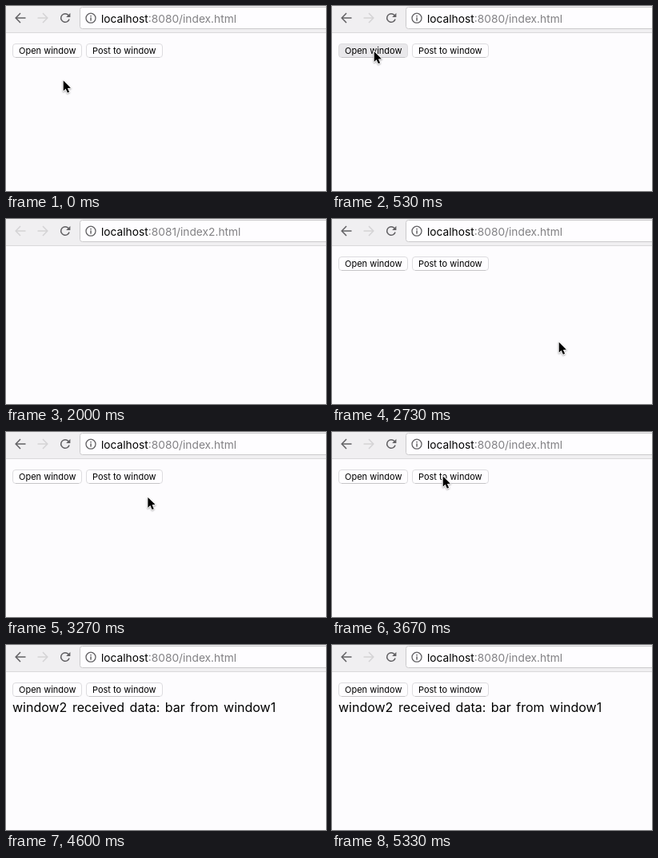
These frames come from a looping animation (400 by 232 pixels, 5.54 s). An HTML page with a canvas:

```html
<!DOCTYPE html>
<html lang="en">
<head>
<meta charset="utf-8">
<title>Window messaging</title>
<style>
  html, body { margin: 0; width: 100%; height: 100%; overflow: hidden; background: #fdfcfe; }
  canvas { display: block; width: 400px; height: 232px; }
</style>
</head>
<body>
<canvas id="stage" width="400" height="232"></canvas>
<script>
const ctx = document.getElementById('stage').getContext('2d');
const LOOP = 5540;
const TICK = 200 / 3;
const FONT = 'Inter, Roboto, sans-serif';
const ICON = '#616063';
const ICON_OFF = '#d4d3d5';

// Pointer moves: start and end time, start and end position.
const moves = [
  { t0: 0, t1: 270, from: [71, 93], to: [52, 56.5] },
  { t0: 2400, t1: 2730, from: [349, 162], to: [283, 154] },
  { t0: 2870, t1: 3470, from: [283, 154], to: [138, 55] }
];

const between = (t, a, b) => t >= a && t < b;

function text(str, x, y, size, color = '#000', wordSpacing = 0) {
  ctx.font = `${size}px ${FONT}`;
  ctx.wordSpacing = `${wordSpacing}px`;
  ctx.fillStyle = color;
  ctx.fillText(str, x, y);
  return x + ctx.measureText(str).width;
}

function line(points, color, width) {
  ctx.beginPath();
  points.forEach(([x, y]) => ctx.lineTo(x, y));
  ctx.strokeStyle = color;
  ctx.lineWidth = width;
  ctx.stroke();
}

function arrow(cx, dir, color) {
  const tip = cx + 6 * dir;
  line([[cx - 6.5 * dir, 15], [tip, 15]], color, 1.5);
  line([[cx, 9], [tip - 0.2 * dir, 15], [cx, 21]], color, 1.5);
}

function reloadIcon() {
  ctx.beginPath();
  ctx.arc(74, 15, 5.3, 0.3, Math.PI * 1.77);
  ctx.strokeStyle = ICON;
  ctx.lineWidth = 1.5;
  ctx.stroke();
  ctx.beginPath();
  ctx.moveTo(80.4, 8.8);
  ctx.lineTo(80.4, 14);
  ctx.lineTo(75.2, 14);
  ctx.fillStyle = ICON;
  ctx.fill();
}

function stopIcon() {
  line([[68.6, 9.8], [79.2, 20.4]], ICON, 1.7);
  line([[79.2, 9.8], [68.6, 20.4]], ICON, 1.7);
}

function infoIcon() {
  ctx.beginPath();
  ctx.arc(106, 15.2, 6, 0, Math.PI * 2);
  ctx.strokeStyle = ICON;
  ctx.lineWidth = 1.3;
  ctx.stroke();
  ctx.fillStyle = ICON;
  ctx.fillRect(105.3, 11.8, 1.5, 1.6);
  ctx.fillRect(105.3, 14.4, 1.5, 4.2);
}

function toolbar(path, canGoBack, loading) {
  ctx.fillStyle = '#f0eff1';
  ctx.fillRect(0, 0, 400, 34);
  ctx.fillStyle = '#dad9db';
  ctx.fillRect(0, 33, 400, 1);

  ctx.beginPath();
  ctx.roundRect(92.5, 1.5, 330, 27, 3);
  ctx.fillStyle = '#fefdff';
  ctx.fill();
  ctx.strokeStyle = '#cac9cb';
  ctx.lineWidth = 1;
  ctx.stroke();

  arrow(18, -1, canGoBack ? ICON : ICON_OFF);
  arrow(46, 1, ICON_OFF);
  loading ? stopIcon() : reloadIcon();
  infoIcon();
  const x = text('localhost', 119, 20.5, 13.76);
  text(path, x, 20.5, 13.76, '#828184');
}

function button(label, x, width, pressed) {
  ctx.beginPath();
  ctx.roundRect(x + 0.5, 47.5, width - 1, 17, 3.5);
  ctx.fillStyle = pressed ? '#e9e8eb' : '#fefdff';
  ctx.fill();
  ctx.strokeStyle = '#dddcdf';
  ctx.lineWidth = 1;
  ctx.stroke();
  line([[x + 4, 64.5], [x + width - 4, 64.5]], '#c6c5c8', 1);
  text(label, x + 8, 60, 11);
}

function pointer([x, y]) {
  ctx.save();
  ctx.translate(x + 0.7, y + 0.5);
  ctx.beginPath();
  [[0, 0], [0, 13], [2.9, 10.2], [5.2, 15.3], [7.4, 14.3], [5.2, 9.4], [9.2, 9.2]]
    .forEach(([px, py]) => ctx.lineTo(px, py));
  ctx.closePath();
  ctx.lineJoin = 'round';
  ctx.shadowColor = 'rgba(0,0,0,.35)';
  ctx.shadowBlur = 2;
  ctx.shadowOffsetY = 1;
  ctx.strokeStyle = '#fff';
  ctx.lineWidth = 1.8;
  ctx.stroke();
  ctx.shadowColor = 'transparent';
  ctx.fillStyle = '#000';
  ctx.fill();
  ctx.restore();
}

function pointerAt(t) {
  const move = moves.filter(m => t >= m.t0).pop();
  const p = Math.min(1, (t - move.t0) / (move.t1 - move.t0));
  const ease = p * p * (3 - 2 * p);
  return move.from.map((v, i) => v + (move.to[i] - v) * ease);
}

function draw(t) {
  ctx.fillStyle = '#fdfcfe';
  ctx.fillRect(0, 0, 400, 232);

  const popup = between(t, 660, 2395);
  toolbar(popup ? ':8081/index2.html' : ':8080/index.html', !popup, between(t, 660, 725));
  if (!popup) {
    button('Open window', 8, 87, between(t, 525, 660));
    button('Post to window', 100, 96, between(t, 3525, 3660));
    if (t >= 3725) {
      text('window2 received data: bar from window1', 8, 84, 16, '#000', 2);
    }
  }
  if (!between(t, 865, 2395) && t < 4595) pointer(pointerAt(t));
}

function frame() {
  const t = performance.now() % LOOP;
  draw(Math.floor((t + 3.4) / TICK) * TICK);
  requestAnimationFrame(frame);
}
frame();
</script>
</body>
</html>
```
